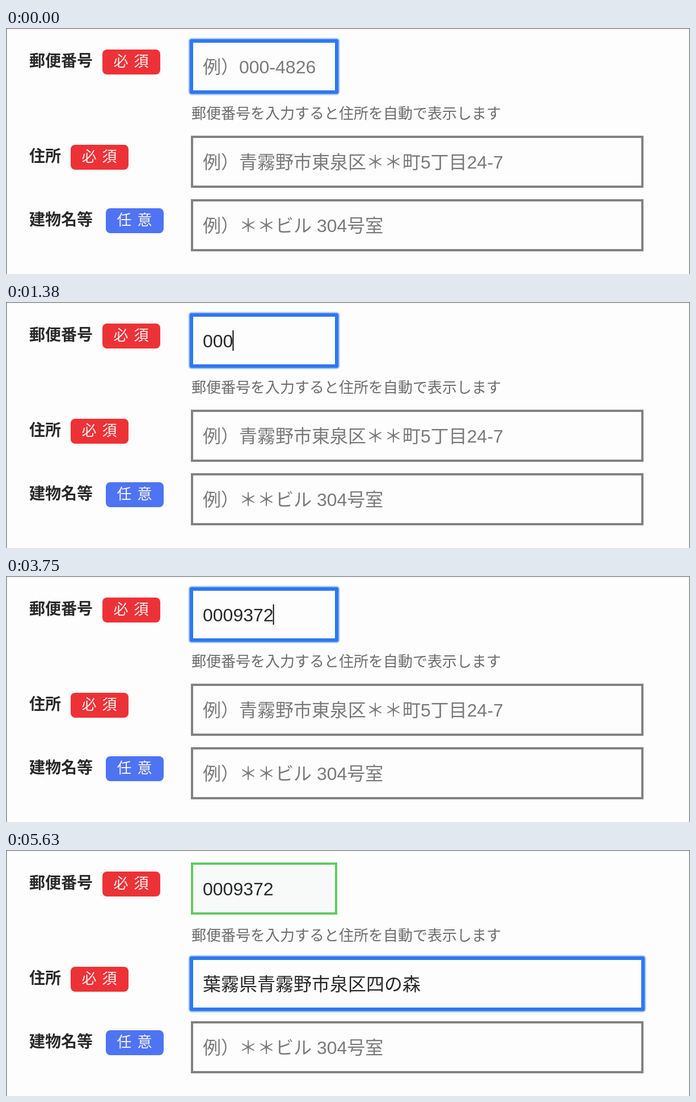
These frames come from a looping animation (1206x434 px, 5870 ms). An HTML page:

```html
<!DOCTYPE html>
<html lang="ja">
<head>
<meta charset="utf-8">
<title>住所フォーム</title>
<style>
  html, body { margin: 0; width: 100%; height: 100%; overflow: hidden; background: #fdfdfd; }
  svg { display: block; width: 100%; height: 100%; }
  text { font-family: "Liberation Sans", "Noto Sans CJK JP", "Noto Sans CJK", sans-serif; white-space: pre; }
  .label { font-size: 28px; font-weight: 700; fill: #2a2a2a; }
  .badge { font-size: 26px; font-weight: 300; fill: #fdf4f4; }
  .hint { font-size: 26px; font-weight: 300; fill: #6c6c6c; }
  .value { font-size: 32px; font-weight: 300; }
</style>
</head>
<body>
<svg id="stage" viewBox="0 0 1206 434"></svg>
<script>
const LOOP = 5870;
const FILL_AT = 3880;
const DIGIT = 17.8;
const PAPER = '#fdfdfd', INK = '#282828', FAINT = '#7a7a7a';
const GRAY = '#828282', GREEN = '#62c962', RING = '#2f78ee', RED = '#ed3237', BLUE = '#4e74f4';
const CODE = '0009372';
const KEYS = [880, 1005, 1130, 2130, 3130, 3255, 3380];
const CARET_ON = [[130, 630], [880, 1630], [2130, 2630], [3130, FILL_AT]];

const stage = document.getElementById('stage');

function add(tag, attrs, parent = stage) {
  const el = document.createElementNS('http://www.w3.org/2000/svg', tag);
  for (const key in attrs) el.setAttribute(key, attrs[key]);
  parent.appendChild(el);
  return el;
}

function rect(x, y, width, height, fill, rx = 0, parent = stage) {
  return add('rect', { x, y, width, height, fill, rx }, parent);
}

function text(x, y, cls, str = '') {
  const el = add('text', { x, y, class: cls });
  el.textContent = str;
  return el;
}

function badge(x, y, str, color) {
  rect(x, y, 102, 44, color, 8);
  [...str].forEach((ch, i) => text(x + 19.5 + 36 * i, y + 29.5, 'badge', ch));
}

// An input box with a focus ring around it and one line of text
function field(y, width, placeholder) {
  const ring = add('g', {});
  const layer = (grow, color, r, opacity) =>
    rect(326 - grow, y - grow, width + 2 * grow, 92 + 2 * grow, color, r, ring)
      .setAttribute('opacity', opacity);
  layer(5, '#a9c8f8', 6, 0.45);
  layer(3.5, '#86b1f6', 5, 1);
  layer(2, RING, 3, 1);
  const box = add('rect', { x: 328, y: y + 2, width: width - 4, height: 88, 'stroke-width': 4 });
  const line = text(347, y + 58, 'value');
  return {
    show(value, focused, valid) {
      ring.setAttribute('visibility', focused ? 'visible' : 'hidden');
      box.setAttribute('stroke', focused ? RING : valid ? GREEN : GRAY);
      box.setAttribute('fill', valid ? '#f8faf9' : PAPER);
      line.textContent = value || placeholder;
      line.setAttribute('fill', value ? INK : FAINT);
    }
  };
}

rect(0, 0, 1206, 434, PAPER);
rect(0, 0, 1206, 1.5, '#868686');
rect(0, 0, 1.5, 434, '#868686');
rect(1204.5, 0, 1.5, 434, '#868686');

text(41, 68, 'label', '郵便番号');
text(41, 236, 'label', '住所');
text(41, 348, 'label', '建物名等');
badge(170, 38, '必須', RED);
badge(114, 206, '必須', RED);
badge(176, 318, '任意', BLUE);
text(327, 159.5, 'hint', '郵便番号を入力すると住所を自動で表示します');

const postcode = field(22, 258, '例）000-4826');
const address = field(190, 798, '例）青霧野市東泉区＊＊町5丁目24-7');
const building = field(302, 798, '例）＊＊ビル 304号室');
const caret = rect(346, 50, 2, 36, '#111');

function draw(t) {
  const count = KEYS.filter(at => t >= at).length;
  const filled = t >= FILL_AT;
  postcode.show(CODE.slice(0, count), !filled, filled);
  address.show(filled ? '葉霧県青霧野市泉区四の森' : '', filled, false);
  building.show('', false, false);
  caret.setAttribute('x', 346 + DIGIT * count);
  const lit = CARET_ON.some(([from, to]) => t >= from && t < to);
  caret.setAttribute('visibility', lit ? 'visible' : 'hidden');
}

const start = performance.now();
function tick() {
  draw((performance.now() - start) % LOOP);
  requestAnimationFrame(tick);
}
draw(0);
requestAnimationFrame(tick);
</script>
</body>
</html>
```
